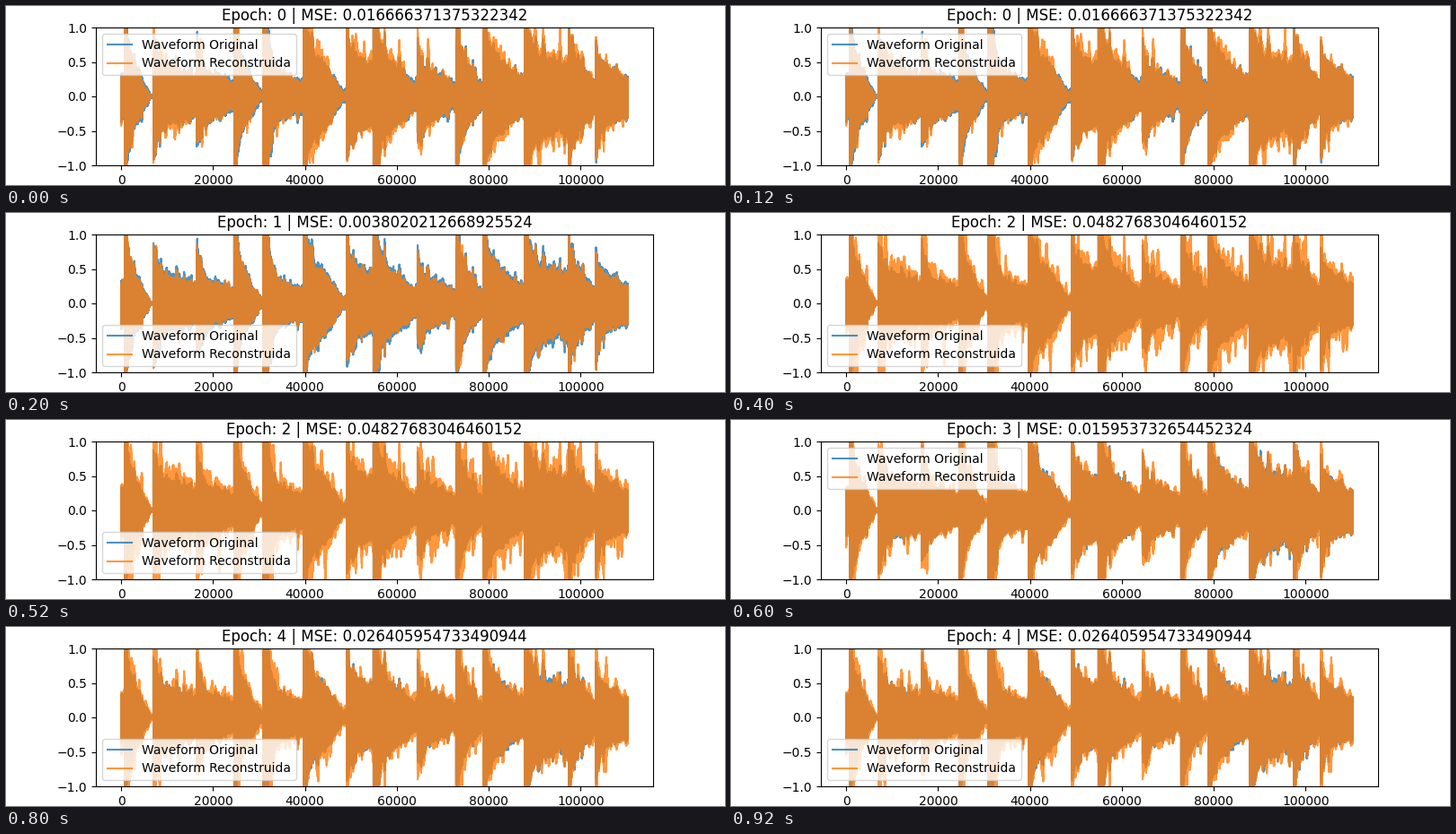
Write a matplotlib script that moves like this. It is 800 px wide and 200 px high and loops after 1 s.

```python
import numpy as np
import matplotlib.pyplot as plt
from matplotlib.animation import FuncAnimation

SAMPLES = 110250
POINTS = 9000
ATTACK_DECAY = 1.1  # thousands of samples

# Each note: start (thousands of samples), attack, sustain, share of sustain left at the end
NOTES = [
    (0.0, 0.1, 0.30, 0.8),
    (0.8, 1.0, 0.42, 0.05),
    (7.0, 0.5, 0.45, 0.7),
    (16.4, 0.5, 0.38, 0.6),
    (24.6, 1.2, 0.38, 0.2),
    (30.9, 2.0, 0.32, 0.8),
    (39.7, 0.9, 0.62, 0.15),
    (49.1, 0.5, 0.52, 0.9),
    (54.9, 1.0, 0.58, 0.4),
    (64.5, 0.3, 0.42, 0.5),
    (72.9, 0.9, 0.48, 0.4),
    (78.8, 0.9, 0.60, 0.5),
    (87.8, 1.1, 0.62, 0.8),
    (97.4, 0.5, 0.55, 0.5),
    (103.3, 0.4, 0.45, 0.7),
]

# Each epoch: MSE, legend place, sustain gain, contrast, attack gain
EPOCHS = [
    ("0.016666371375322342", "upper left", 1.5, 1.37, 0.9),
    ("0.0038020212668925524", "lower left", 0.9, 1.0, 1.0),
    ("0.04827683046460152", "lower left", 1.3, 1.0, 1.4),
    ("0.015953732654452324", "upper left", 0.9, 0.85, 1.35),
    ("0.026405954733490944", "lower left", 0.85, 0.75, 1.5),
]

x = np.linspace(0, SAMPLES, POINTS)
signs = np.where(np.arange(POINTS) % 2, -1, 1)


def envelope(gain=1.0, contrast=1.0, attack_gain=1.0):
    k = x / 1000
    env = np.zeros(POINTS)
    ends = [note[0] for note in NOTES[1:]] + [SAMPLES / 1000]
    for (start, attack, sustain, left), end in zip(NOTES, ends):
        inside = (k >= start) & (k <= end)
        t = k[inside] - start
        u = np.minimum(1, t / (0.9 * (end - start)))
        body = sustain * (1 - (1 - left) * u ** 2)
        burst = attack * np.exp(-t / ATTACK_DECAY)
        env[inside] = gain * body ** contrast + attack_gain * burst
    return env


def jagged(rough, seed):
    """Uneven outline with sparse spikes, different above and below zero."""
    rng = np.random.default_rng(seed)
    knots = np.linspace(0, SAMPLES, 420)
    above, below = (np.interp(x, knots, 1 + rough * (rng.exponential(size=420) - 1))
                    for _ in range(2))
    return np.where(signs > 0, above, below)


carrier = signs * np.random.default_rng(7).uniform(0.7, 1, POINTS) * jagged(0.13, 3)
original = envelope() * carrier


def reconstruction(epoch):
    mse, _, *shape = EPOCHS[epoch]
    return envelope(*shape) * carrier * jagged(float(mse) ** 0.5, 20 + epoch)


fig, ax = plt.subplots(figsize=(8, 2), dpi=100)


def draw(epoch):
    mse, place, *_ = EPOCHS[epoch]
    ax.clear()
    ax.plot(x, original, label="Waveform Original", alpha=0.8)
    ax.plot(x, reconstruction(epoch), label="Waveform Reconstruida", alpha=0.8)
    ax.set_ylim(-1, 1)
    ax.set_title(f"Epoch: {epoch} | MSE: {mse}")
    ax.legend(loc=place)
    return ax.lines


anim = FuncAnimation(fig, draw, frames=len(EPOCHS), interval=200,
                     init_func=lambda: [], repeat=True, repeat_delay=0)
plt.show()
```
